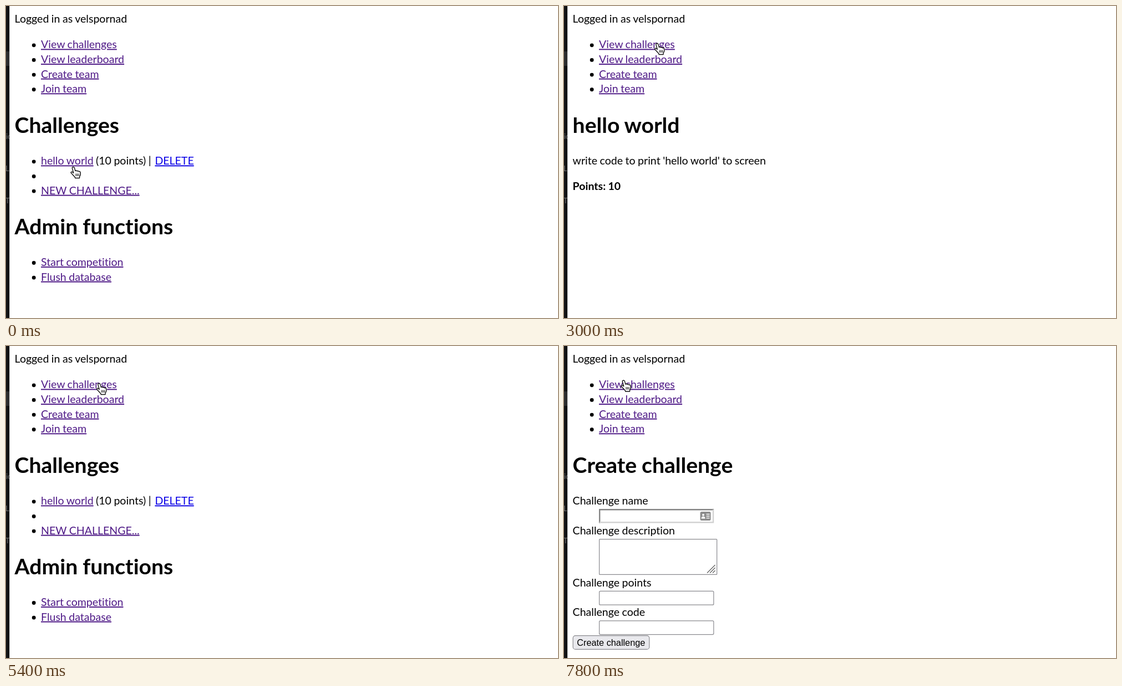
An HTML page for the animation above (8000 ms loop, 995x563 px).

```html
<!DOCTYPE html>
<html lang="en">
<head>
<meta charset="utf-8">
<title>Challenge board</title>
<style>
  html, body { margin: 0; width: 100%; height: 100%; overflow: hidden; background: #fff; }
  svg { display: block; width: 995px; height: 563px; }
  text { font: 19.56px Lato, "Open Sans", sans-serif; word-spacing: -.5px; white-space: pre; font-variant-ligatures: none; }
  .title { font-size: 39.1px; font-weight: 700; }
  .bold { font-weight: 700; }
  .link { fill: #4f1a87; text-decoration: underline; text-decoration-thickness: 1.1px; text-underline-offset: 1.5px; }
  .fresh { fill: #0a00e6; }
  .link.active { fill: #dc0008; }
  .side { font-size: 13px; fill: #6c6c6c; }
  .button { font: 16.29px "Liberation Sans", Arial, sans-serif; word-spacing: 0; }
</style>
</head>
<body>
<svg id="stage" viewBox="0 0 995 563" xmlns="http://www.w3.org/2000/svg"></svg>
<script>
const LOOP = 8000, STEP = 200, LINE = 26.65;
const LEFT = 15.6, INDENT = 63;
const stage = document.getElementById('stage');

function add(parent, tag, attrs = {}, content = '') {
  const node = document.createElementNS('http://www.w3.org/2000/svg', tag);
  for (const key in attrs) node.setAttribute(key, attrs[key]);
  node.textContent = content;
  return parent.appendChild(node);
}
const group = (parent = stage) => add(parent, 'g');
const label = (parent, x, y, content, cls = '') => add(parent, 'text', { x, y, class: cls }, content);
const bullet = (parent, y) => add(parent, 'circle', { cx: 50.2, cy: y - 5.6, r: 3.4 });
const box = (parent, x, y, width, height, attrs = {}) =>
  add(parent, 'rect', { x, y, width, height, fill: '#fff', ...attrs });
const stroke = (parent, d, color, width = 1.2) =>
  add(parent, 'path', { d, fill: 'none', stroke: color, 'stroke-width': width });

function item(parent, y, content, cls = 'link') {
  bullet(parent, y);
  return label(parent, INDENT, y, content, cls);
}

// Dark window edge behind the page
const edge = group();
box(edge, 0, 0, 8, 563, { fill: '#111213' });
box(edge, 0, 82, 8, 26, { fill: '#2b2c2d' });
label(edge, 0, 240, 'ic', 'side');
label(edge, -1, 298, 'L', 'side');
label(edge, -1, 356, 'T', 'side');
box(stage, 6.2, 0, 989, 563);

// Shared header
const header = group();
label(header, LEFT, 30.4, 'Logged in as velspornad');
const nav = ['View challenges', 'View leaderboard', 'Create team', 'Join team']
  .map((name, i) => item(header, 76.4 + i * LINE, name));

// Challenge list
const list = group();
label(list, LEFT, 228.6, 'Challenges', 'title');
const hello = item(list, 286.4, 'hello world');
label(list, 162, 286.4, '(10 points) |');
label(list, 268.4, 286.4, 'DELETE', 'link fresh');
bullet(list, 286.4 + LINE);
const create = item(list, 286.4 + 2 * LINE, 'NEW CHALLENGE...');
label(list, LEFT, 411.8, 'Admin functions', 'title');
item(list, 469.1, 'Start competition');
item(list, 469.1 + LINE, 'Flush database');

// Single challenge
const detail = group();
label(detail, LEFT, 228.6, 'hello world', 'title');
label(detail, LEFT, 286.4, "write code to print 'hello world' to screen");
label(detail, LEFT, 332, 'Points: 10', 'bold');

// Creation form
const form = group();
label(form, LEFT, 228.6, 'Create challenge', 'title');
[['name', 286.4], ['description', 339.7], ['points', 433.9], ['code', 487.3]]
  .forEach(([name, y]) => label(form, LEFT, y, 'Challenge ' + name));

stroke(form, 'M64.2 319.5V295.2H270', '#858585', 2.4);
stroke(form, 'M269 295V318.3H64', '#d2d2d2', 2.4);
box(form, 245.5, 299, 19, 16, { rx: 2.5, fill: '#8c8c8c' });
add(form, 'circle', { cx: 251, cy: 304.7, r: 2, fill: '#fff' });
add(form, 'path', { d: 'M247.5 311.5q0-4 3.5-4t3.5 4z', fill: '#fff' });
stroke(form, 'M256.5 303.5h6M256.5 307h6M256.5 310.5h6', '#fff', 1.5);

const outline = { stroke: '#8a8a8f', 'stroke-width': 1.2, rx: 2 };
box(form, 63.6, 348.6, 212, 63.8, { ...outline, rx: 1 });
stroke(form, 'M258 409.5l14.5-14.5M263 409.5l9.5-9.5M268 409.5l4.5-4.5', '#606060');
box(form, 63.6, 442.4, 206.2, 24.8, outline);
box(form, 63.6, 495.8, 206.2, 24.8, outline);
box(form, 16.2, 522.6, 137.6, 24.8, { ...outline, rx: 4.5, fill: '#e9e9ed' });
add(form, 'text', { x: 84.8, y: 540.8, class: 'button', 'text-anchor': 'middle' }, 'Create challenge');

// Pointer and click ring
const ring = add(stage, 'circle', { fill: '#dbe7fa', 'fill-opacity': .18, stroke: '#b9cff2', 'stroke-width': 3 });
const hand = group();
add(hand, 'path', {
  d: 'M-2.3 1.6C-2.3-.3 1.2-.6 1.8 1.4L3.4 7C4.2 5.9 6.2 6.2 6.6 7.6C7.6 6.6 9.4 7 9.7 8.3' +
     'C10.8 7.6 12.5 8.2 12.6 10C13.2 13 12.4 15.5 11.2 17L11 20H3.2L2.6 18' +
     'C0 15.5-1.8 13-4.2 10.8C-5.2 9.4-3.2 8-1.8 9.2L.2 10.8Z',
  fill: '#fff', stroke: '#111', 'stroke-width': 1.4, 'stroke-linejoin': 'round'
});
stroke(hand, 'M4.6 12v4.6M7 12v4.6M9.4 12v4.6', '#111', 1.1);
const beam = group();
const beamPath = 'M-4-9.3Q0-9.3 0-6.5Q0-9.3 4-9.3M0-6.5V6.5M-4 9.3Q0 9.3 0 6.5Q0 9.3 4 9.3M-2.2 3.2H2.2';
stroke(beam, beamPath, '#fff', 3.4);
stroke(beam, beamPath, '#111', 1.3);

// Each entry holds from its start time until the next one
const pages = [[0, list], [1400, detail], [4600, list], [7200, form]];
const moves = [
  [0, 121.5, 290.5, hand], [200, 125.5, 278, hand], [1600, 126, 277.5, beam],
  [3000, 168, 67.5, hand], [6200, 199, 331, hand], [7400, 107.5, 62, hand]
];
const clicks = [[400, hello], [3400, nav[0]], [6800, create]];
const latest = (track, t) => track.filter(entry => entry[0] <= t).pop();
const show = (node, visible) => node.setAttribute('display', visible ? 'inline' : 'none');

function render(time) {
  const t = Math.floor((time % LOOP) / STEP) * STEP;
  const page = latest(pages, t)[1];
  for (const view of [list, detail, form]) show(view, view === page);

  const [, x, y, pointer] = latest(moves, t);
  for (const shape of [hand, beam]) show(shape, shape === pointer);
  pointer.setAttribute('transform', `translate(${x} ${y})`);

  show(ring, false);
  for (const [start, link] of clicks) {
    const age = t - start;
    link.classList.toggle('active', age >= 0 && age < STEP);
    if (age < 0 || age >= 2 * STEP) continue;
    show(ring, true);
    ring.setAttribute('cx', x);
    ring.setAttribute('cy', y);
    ring.setAttribute('r', 22 + 8 * age / STEP);
    ring.setAttribute('opacity', 1 - .65 * age / STEP);
  }
}

const origin = performance.now();
function tick() {
  render(performance.now() - origin);
  requestAnimationFrame(tick);
}
tick();
</script>
</body>
</html>
```
